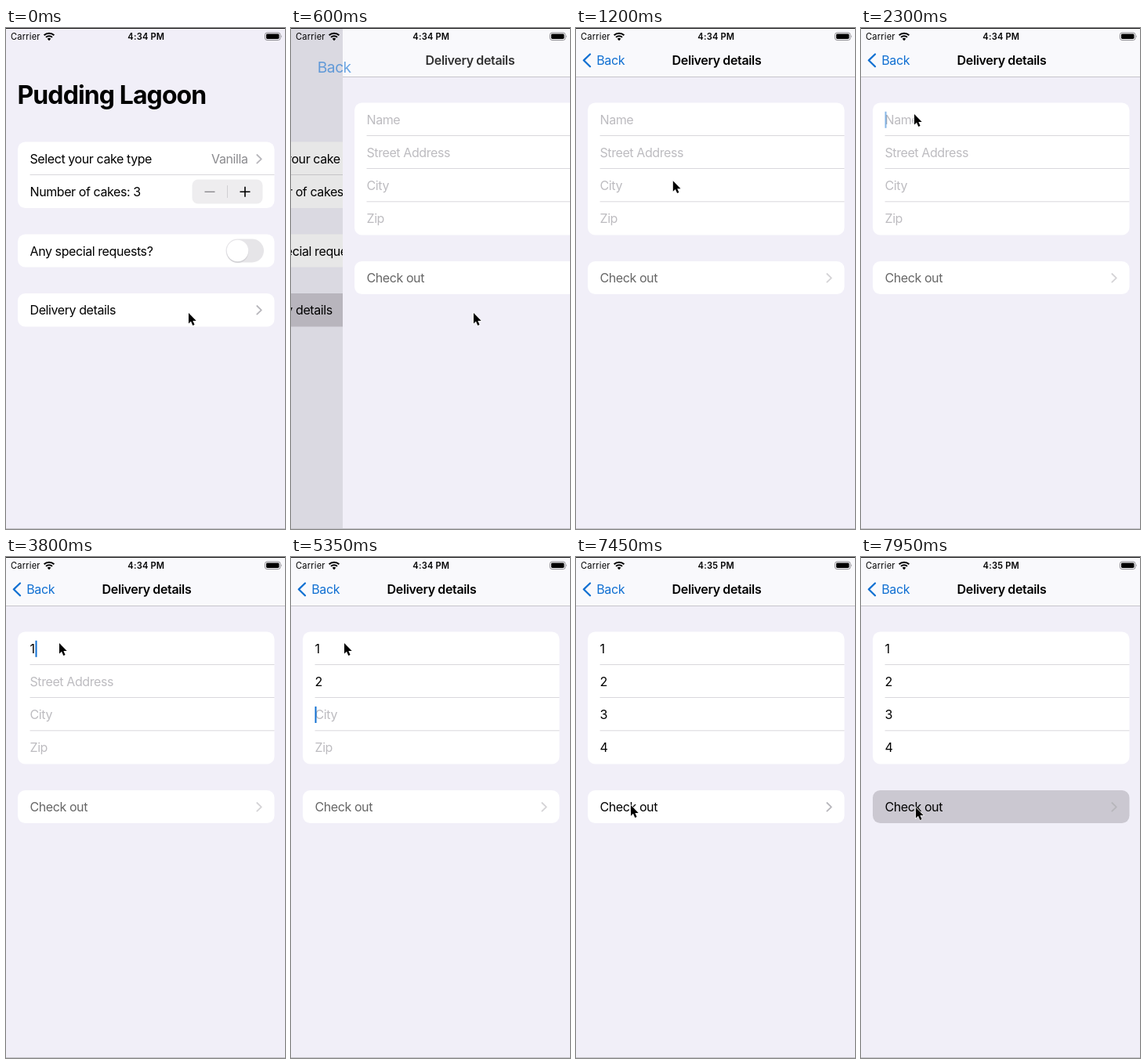
An HTML page that plays this animation: 356x640 px, repeating every 8000 ms.

```html
<!DOCTYPE html>
<html lang="en">
<head>
<meta charset="utf-8">
<title>Order form</title>
<style>
  html, body { margin: 0; width: 100%; height: 100%; overflow: hidden; background: #f1eff8; }
  svg { display: block; width: 356px; height: 640px; }
  text { font: 16px Inter, sans-serif; letter-spacing: -.41px; white-space: pre; }
  .big { font-weight: 700; font-size: 32px; letter-spacing: -.9px; }
  .bar { font-weight: 600; letter-spacing: -.36px; }
  .status { font-size: 11.1px; letter-spacing: .2px; }
  .card { fill: #fff; }
  .line { stroke: #d9d8dc; }
  .chevron { fill: none; stroke: #b7b6bb; stroke-width: 1.8; stroke-linecap: round; stroke-linejoin: round; }
  .blue { fill: #1170d2; }
</style>
</head>
<body>
<svg viewBox="0 0 356 640">
  <rect width="356" height="640" fill="#f1eff8"/>

  <g id="home">
    <text id="heading" class="big" x="14.5" y="97">Pudding Lagoon</text>
    <rect class="card" x="15" y="145.5" width="327.5" height="84.5" rx="9.5"/>
    <path class="line" d="M30.5 187.5H342.5"/>
    <text x="30.5" y="172.7">Select your cake type</text>
    <text x="308.5" y="172.7" text-anchor="end" fill="#8a8a8e">Vanilla</text>
    <path class="chevron" d="M320.3 162l5.5 5.3-5.5 5.3"/>
    <text x="30.5" y="214.7">Number of cakes: 3</text>
    <rect x="237.5" y="193.5" width="90" height="31" rx="7.5" fill="#eeedef"/>
    <path d="M282.5 201v16" stroke="#d0cfd3"/>
    <path d="M253.5 209.3h13" stroke="#8b8a8e" stroke-width="1.4"/>
    <path d="M298.5 209.3h13M305 202.8v13" stroke="#000" stroke-width="1.6"/>
    <rect class="card" x="15" y="263.5" width="327.5" height="42" rx="9.5"/>
    <text x="30.5" y="290.5">Any special requests?</text>
    <rect x="280.5" y="269.5" width="48.5" height="30" rx="15" fill="#e6e5e8"/>
    <circle cx="295.5" cy="286" r="14" fill="#d3d2d6"/>
    <circle cx="295.5" cy="284.5" r="13.8" fill="#fff"/>
    <rect id="details" class="card" x="15" y="339" width="327.5" height="42.5" rx="9.5"/>
    <text x="30.5" y="366">Delivery details</text>
    <path class="chevron" d="M320.3 355l5.5 5.3-5.5 5.3"/>
  </g>
  <rect id="shade" width="356" height="640"/>

  <g id="form">
    <rect width="356" height="640" fill="#f1eff8"/>
    <rect width="356" height="63" fill="#f9f9fc"/>
    <path d="M0 62.5H356" stroke="#c6c5cb"/>
    <rect class="card" x="15" y="95.5" width="327.5" height="169" rx="9.5"/>
    <path class="line" d="M30.5 137.5H342.5M30.5 179.5H342.5M30.5 221.8H342.5"/>
    <g id="fields"></g>
    <rect id="caret" class="blue" width="2" height="21"/>
    <rect id="check" class="card" x="15" y="298" width="327.5" height="42" rx="9.5"/>
    <g id="checkLabel">
      <text x="30.5" y="325">Check out</text>
      <path class="chevron" d="M320.3 314l5.5 5.3-5.5 5.3"/>
    </g>
  </g>

  <g id="nav">
    <text id="title" class="bar" x="179.5" y="47" text-anchor="middle">Delivery details</text>
    <path id="backArrow" d="M18 33.5L9.8 41.3 18 49.3" fill="none" stroke="#1170d2" stroke-width="2.3" stroke-linecap="round" stroke-linejoin="round"/>
    <text id="back" class="blue">Back</text>
  </g>

  <path d="M0 .5H356" stroke="#111"/>
  <path d="M0 639.5H356" stroke="#c6c5cb"/>
  <text class="status" x="6" y="15">Carrier</text>
  <g fill="none" stroke="#000" stroke-width="2">
    <path d="M48.6 9.3a9.1 9.1 0 0 1 12.8 0M51 11.9a5.7 5.7 0 0 1 8 0"/>
    <path d="M55 16.2l-2.3-2.5a3.4 3.4 0 0 1 4.6 0z" fill="#000" stroke="none"/>
  </g>
  <text id="clock" class="status" x="178.8" y="15" text-anchor="middle" font-weight="600" style="font-weight:600"></text>
  <rect x="330.5" y="6" width="19.5" height="9.5" rx="2.6" fill="none" stroke="#8d8c91"/>
  <rect x="332" y="7.5" width="16.5" height="6.5" rx="1.4"/>
  <path d="M351.2 9.2q1.6 1.5 0 3z" fill="#8d8c91"/>

  <path id="cursor" d="M0 0V13.6l3-2.8 2.3 5.1 2.3-1-2.2-4.9h4.3z" stroke="#fff" stroke-width="1.2" paint-order="stroke"/>
</svg>
<script>
const LOOP = 8000, STEP = 50, PUSH = 600;
const $ = id => document.getElementById(id);
const set = (id, attrs) => {
  for (const k in attrs) $(id).setAttribute(k, attrs[k]);
};
const clamp = v => Math.min(1, Math.max(0, v));

const fields = ['Name', 'Street Address', 'City', 'Zip'];
const focusAt = [1700, 3950, 4900, 5850];
const typedAt = [3700, 4500, 5500, 6250];
const rowY = i => 117.3 + i * 42.1;

$('fields').innerHTML = fields.map((_, i) =>
  `<text x="30.5" y="${rowY(i) + 5.6}"></text>`).join('');
const inputs = [...$('fields').children];

// [time, value]: each value holds until the next
const blink = [[1700, 1], [2300, .5], [2600, .2], [2650, 0], [2800, .4], [2950, 1],
  [3300, .5], [3550, 0], [3700, 1], [7200, .5], [7300, 0]];
const held = (keys, t) => keys.reduce((v, k) => t >= k[0] ? k[1] : v, 0);

// [time, x, y]
const path = [[0, 233, 364], [800, 233, 364], [1450, 70, 112], [1650, 68, 110],
  [6800, 68, 110], [6850, 68, 146], [7500, 70, 320], [LOOP, 70, 320]];

function pointer(t) {
  const i = path.findIndex(p => p[0] > t);
  const [t0, x0, y0] = path[i - 1], [t1, x1, y1] = path[i];
  const p = (t - t0) / (t1 - t0), e = p * p * (3 - 2 * p);
  return `translate(${x0 + (x1 - x0) * e} ${y0 + (y1 - y0) * e})`;
}

function draw(now) {
  const t = Math.floor(now % LOOP / STEP) * STEP;
  const pushed = t >= PUSH;

  let slide = pushed ? 66 * Math.exp((PUSH - t) / 62.5) : 356;
  if (slide < .3) slide = 0;
  const progress = 1 - slide / 356;
  set('home', { transform: `translate(${-107 * progress})` });
  set('heading', { opacity: pushed ? 0 : 1 });
  set('details', { style: `fill:${t >= 300 ? '#cbc8d1' : '#fff'}` });
  set('shade', { opacity: .115 * progress });
  set('form', { transform: `translate(${slide})` });

  const u = (1 - clamp((t - PUSH) / 150)) ** 2;
  set('nav', { opacity: pushed ? 1 : 0 });
  set('title', { transform: `translate(${49 * u})`, opacity: 1 - .2 * u });
  set('backArrow', { opacity: 1 - u });
  set('back', {
    transform: `translate(${26.3 + 7.5 * u} ${47 + 10 * u}) scale(${1 + .2 * u})`,
    opacity: 1 - .4 * u
  });

  inputs.forEach((el, i) => {
    const typed = t >= typedAt[i];
    el.textContent = typed ? i + 1 : fields[i];
    el.setAttribute('fill', typed ? '#000' : '#bdbcc0');
  });
  const row = Math.max(0, focusAt.filter(f => t >= f).length - 1);
  const caretX = t < typedAt[row] ? 30.5 : row ? 39.8 : 37.5;
  set('caret', { x: caretX, y: rowY(row) - 10.5, opacity: held(blink, t) });

  set('check', { style: `fill:${t >= 7600 ? '#cbc8d1' : '#fff'}` });
  set('checkLabel', { opacity: .6 + .4 * clamp((t - 6350) / 200) });

  $('clock').textContent = t < 6250 ? '4:34 PM' : '4:35 PM';
  set('cursor', { transform: pointer(t) });
  requestAnimationFrame(() => draw(performance.now()));
}
draw(0);
</script>
</body>
</html>
```
